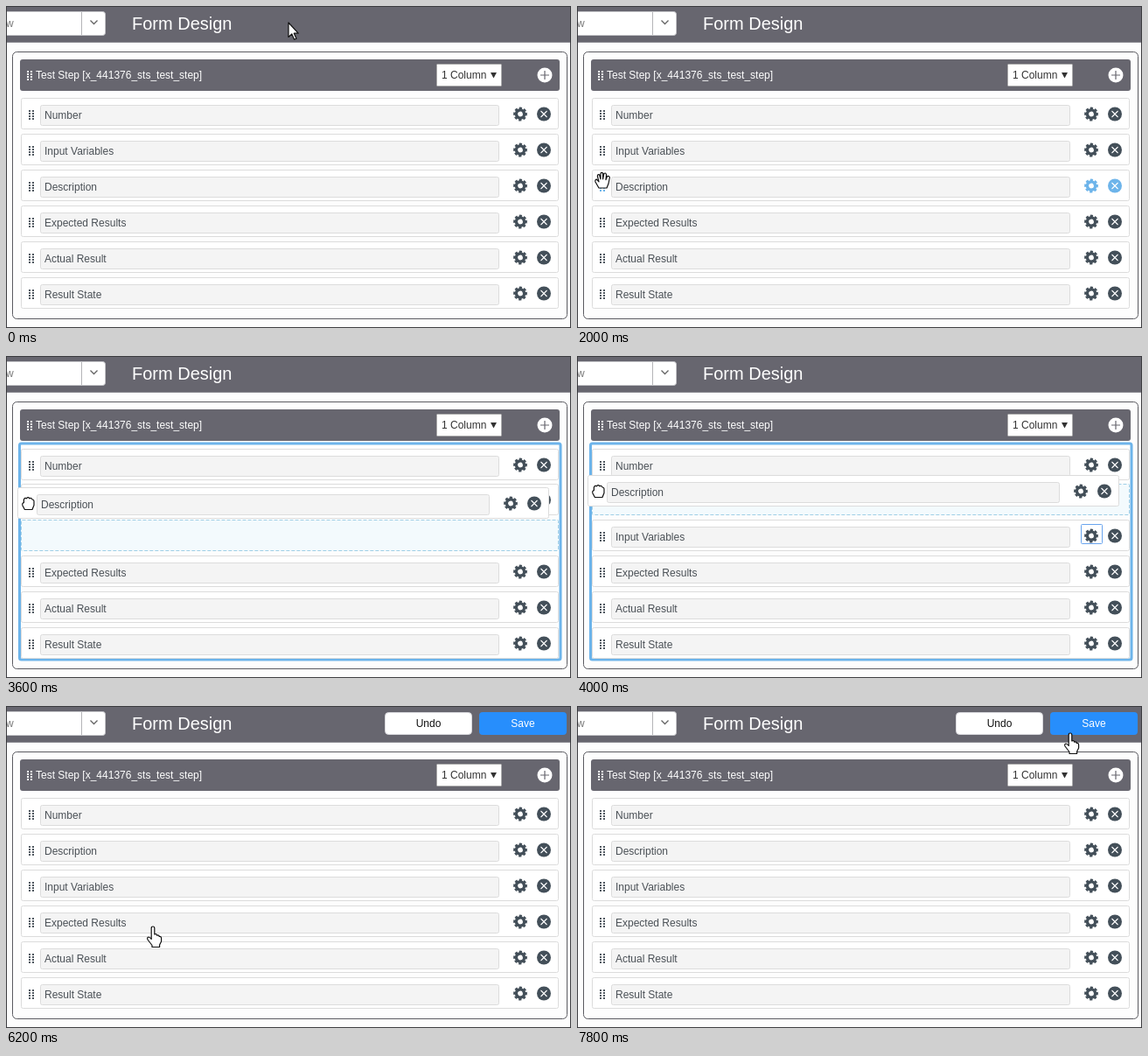
Write an HTML page that moves like this. It is 646 px wide and 368 px high and loops after 8 s.

```html
<!DOCTYPE html>
<html lang="en">
<head>
<meta charset="utf-8">
<title>Form Design</title>
<style>
  html, body { margin: 0; width: 100%; height: 100%; overflow: hidden; background: #fdfdfd; }
  svg { display: block; width: 646px; height: 368px; }
  text { font: 12px "Liberation Sans", Arial, sans-serif; white-space: pre; }
</style>
</head>
<body>
<svg id="stage" viewBox="0 0 646 368" xmlns="http://www.w3.org/2000/svg"></svg>
<script>
const LOOP = 8000, STEP = 200;
const BAR = '#67666f', DARK = '#434f59', BLUE = '#6db4ea', LINE = '#dcdcdc', INK = '#4a5056';
const TOP = 105, PITCH = 41, ROW_H = 35;
const labels = ['Number', 'Input Variables', 'Description', 'Expected Results', 'Actual Result', 'Result State'];
const INPUT = 1, DESC = 2;

// Pointer path: time, x, y
const path = [
  [0, 323, 19], [200, 322, 27], [400, 316, 48], [800, 250, 130], [1200, 120, 205],
  [1600, 45, 208], [2000, 29, 199], [2600, 27, 201], [3000, 27, 201], [3200, 27, 199],
  [3400, 26, 181], [3600, 25, 168], [4000, 24, 154], [4200, 24, 152], [5000, 24, 152],
  [5200, 50, 180], [5600, 165, 256], [5800, 165, 256], [6200, 168, 252], [6800, 240, 215],
  [7400, 480, 90], [7800, 564, 31], [8000, 564, 31]
];
const DRAG = 3600, SWAP = 3800, DROP = 4800, UNDO = 5200, PRESS = 3200;

const cursors = {
  arrow: 'M0 0V16.5L3.8 13L6.6 19.2L9 18.2L6.3 12.2H11.2Z',
  point: 'M-1.8 2Q-1.8 0 0 0T1.8 2V9Q4.4 8 4.6 10.2Q7 9.4 7.2 11.4Q9.6 11 9.6 13.4V17L7.6 21V23.5H-1V21.5L-6 15Q-7 12.4 -5 12Q-3.6 12 -1.8 14.4Z',
  open: 'M-4 9L-8 2Q-8.6 -.8 -6.6 -.8L-4 1.8L-5.6 -4.5Q-5.4 -7 -3.4 -6.2L-2 -1.2V-7.2Q-1.4 -9.6 .6 -8V-1.2L1.8 -7.4Q3.6 -9 4.6 -6.4L4 -.4L5.6 -4.4Q7.6 -5.4 8.4 -3L7 4L5 9Z',
  closed: 'M-3.6 7.5L-6 3Q-7 0 -4.6 -.4V-4Q-3.4 -6.6 -1.6 -5.2Q.2 -7.4 2 -5.2Q4 -6.4 5 -4Q7.2 -4 7 -1V2.5L5 7.5Z'
};

const rect = (x, y, w, h, fill, stroke = 'none', r = 0, more = '') =>
  `<rect x="${x}" y="${y}" width="${w}" height="${h}" rx="${r}" fill="${fill}" stroke="${stroke}" ${more}/>`;
const text = (x, y, s, fill, more = '') => `<text x="${x}" y="${y}" fill="${fill}" ${more}>${s}</text>`;
const line = (d, color, w = 1) => `<path d="${d}" fill="none" stroke="${color}" stroke-width="${w}"/>`;

function grip(x, y, color) {
  let d = '';
  for (let i = 0; i < 8; i++) d += `M${x + (i % 2) * 4} ${y + (i >> 1) * 3}h2v2h-2z`;
  return `<path d="${d}" fill="${color}"/>`;
}

function gear(x, y, color) {
  return `<g fill="none" stroke="${color}" transform="translate(${x} ${y}) rotate(-12)">` +
    '<circle r="4.6" stroke-width="3.4"/>' +
    '<circle r="6.7" stroke-width="2.4" stroke-dasharray="3.1 2.162"/></g>';
}

function cross(x, y, color) {
  return `<circle cx="${x}" cy="${y}" r="8" fill="${color}"/>` +
    line(`M${x - 3.5} ${y - 3.5}l7 7m0 -7l-7 7`, '#fff', 1.1);
}

function row(x, y, label, { hot = false, focus = false, trim = 0 } = {}) {
  const c = hot ? BLUE : DARK;
  return rect(x + .5, y + .5, 614 - trim, ROW_H, '#fff', LINE, 2) +
    grip(x + 9, y + 14, hot ? BLUE : '#505860') +
    rect(x + 22.5, y + 8.5, 524 - trim, 23, '#f4f4f4', LINE, 2) +
    text(x + 27, y + 24, label, INK) +
    (focus ? rect(x + 559.5, y + 5.5, 24, 22, '#fff', '#69a4ee', 1) : '') +
    gear(x + 571 - trim, y + 18.5, c) +
    cross(x + 598 - trim, y + 18.5, c);
}

const backdrop =
  rect(0, 0, 646, 368, '#fdfdfd') +
  rect(0, 0, 646, 41, BAR) +
  line('M0 41.5H646', '#8d8c93') +
  rect(-8.5, 6.5, 122, 27, '#fff', '#c4c4c8', 3) +
  line('M86.5 7V33', '#b4b4b8') +
  text(0, 24, 'w', '#777') +
  line('M96.5 16.5l4 4l4 -4', '#666', 1.3) +
  text(144, 27, 'Form Design', '#fff', 'style="font-size:20px"') +
  rect(7.5, 52.5, 634, 305, '#fdfdfd', '#5a5a60', 5) +
  rect(16, 61, 617, 36, BAR, 'none', 3) +
  grip(24, 74, '#fff') +
  text(34, 83, 'Test Step [x_441376_sts_test_step]', '#fff', 'font-weight="bold"') +
  rect(492.5, 66.5, 74, 25, '#fff', '#aaa', 1) +
  text(498, 83, '1 Column', '#333') +
  '<path d="M554 76h7l-3.5 6.5z" fill="#333"/>' +
  '<circle cx="616" cy="79" r="8.5" fill="#fff"/>' +
  line('M611 79h10M616 74v10', BAR, 1.2);

const edge = rect(.5, .5, 645, 367, 'none', '#3c3c40');

function pointerAt(t) {
  const i = path.findIndex(k => k[0] > t);
  const a = path[i - 1], b = path[i];
  const p = (t - a[0]) / (b[0] - a[0]);
  return [a[1] + (b[1] - a[1]) * p, a[2] + (b[2] - a[2]) * p];
}

function shapeAt(x, y, dragging) {
  if (dragging) return 'closed';
  if (y < 34 && x > 541) return 'point';
  const d = y - TOP;
  if (d < 0 || d > PITCH * 6 || d % PITCH >= ROW_H) return 'arrow';
  return x >= 17 && x < 38 ? 'open' : 'point';
}

function render(time) {
  const t = Math.floor(time / STEP) * STEP;
  const [x, y] = pointerAt(t);
  const dragging = t >= DRAG && t < DROP;
  const shape = shapeAt(x, y, dragging);
  const pressed = t >= PRESS && t < DRAG;
  const hot = pressed ? DESC : shape === 'open' ? Math.floor((y - TOP) / PITCH) : -1;
  const order = t >= SWAP ? [0, DESC, INPUT, 3, 4, 5] : [0, INPUT, DESC, 3, 4, 5];
  let s = backdrop;

  if (t >= UNDO) {
    s += rect(433.5, 7.5, 99, 25, '#fff', '#d8d8dc', 4) +
      text(483, 24, 'Undo', '#111', 'text-anchor="middle"');
  }
  if (t >= DROP) {
    s += rect(541, 7, 100, 26, '#278efc', 'none', 4) +
      text(591, 24, 'Save', '#fff', 'text-anchor="middle" font-weight="bold"');
  }
  if (dragging) s += rect(15.5, 100, 618.5, 247, '#fdfdfd', BLUE, 2, 'stroke-width="3"');

  order.forEach((id, slot) => {
    const top = TOP + slot * PITCH + (dragging && !slot ? 1 : 0);
    if (dragging && id === DESC) {
      s += rect(17.5, top + .5, 614, ROW_H, '#f3fafd', '#9fcfe6', 1, 'stroke-dasharray="4 2"');
    } else {
      s += row(17, top, labels[id], {
        hot: slot === hot,
        focus: id === INPUT && t >= PRESS && t < DROP
      });
    }
  });
  if (dragging) s += row(Math.round(x) - 12, Math.round(y) - 18, labels[DESC], { trim: 7 });

  s += edge + `<path d="${cursors[shape]}" transform="translate(${x} ${y})" fill="#fff" stroke="#111" stroke-width="1.2" stroke-linejoin="round"/>`;
  return s;
}

const stage = document.getElementById('stage');
const start = performance.now();
let shown = -1;
function tick() {
  const t = (performance.now() - start) % LOOP;
  const step = Math.floor(t / STEP);
  if (step !== shown) {
    shown = step;
    stage.innerHTML = render(t);
  }
  requestAnimationFrame(tick);
}
tick();
</script>
</body>
</html>
```
